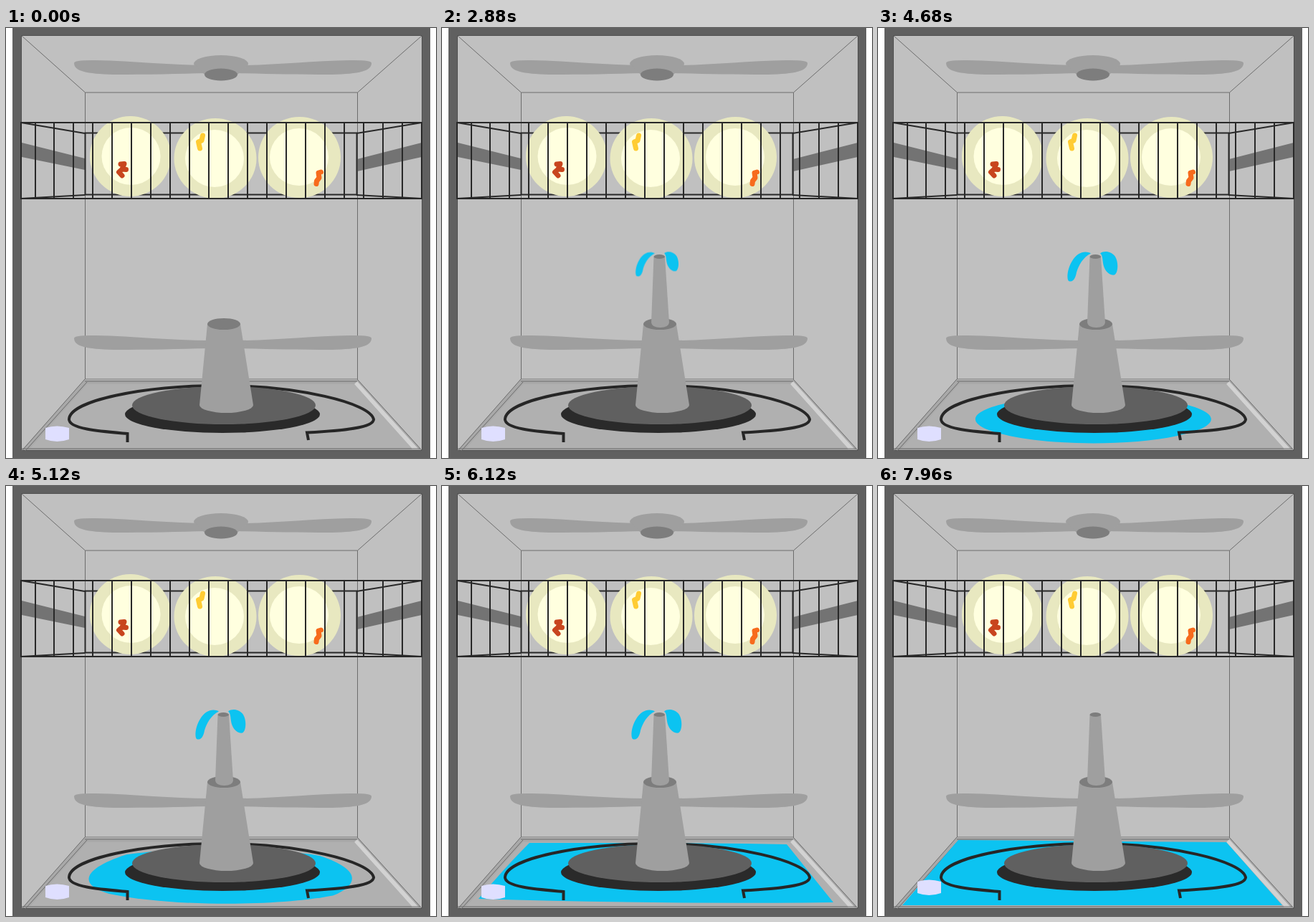
Write an HTML page that moves like this. It is 600 px wide and 600 px high and loops after 8 s.

```html
<!DOCTYPE html>
<html lang="en">
<head>
<meta charset="utf-8">
<title>Dishwasher filling</title>
<style>
  html, body { margin: 0; height: 100%; overflow: hidden; background: #fff; }
  svg { display: block; width: 100vw; height: 100vh; }
  .arm { fill: #9f9f9f; }
  .dark { fill: #7d7d7d; }
  .line { fill: none; stroke: #6c6c6c; }
  .rack { fill: none; stroke: #282828; stroke-width: 2; }
  .rim { fill: #e8e8c0; }
  .well { fill: #ffffdf; }
  .food { fill: none; stroke-width: 7; stroke-linecap: round; stroke-linejoin: round; }
  .water { fill: #0cc3f1; }

  #nozzle, .spray, #puddle, #tablet { animation: 8s linear infinite; }
  #nozzle { animation-name: rise; }
  .spray { animation-name: spray; }
  #puddle { animation-name: fill; }
  #tablet { animation-name: float; }

  @keyframes rise {
    0% { transform: translateY(103px); }
    22.75%, 100% { transform: none; }
  }
  @keyframes spray {
    0%, 22.99% { transform: scale(0); }
    23% { transform: scale(.25); }
    40%, 92.5% { transform: scale(1); }
    99%, 100% { transform: scale(0); }
  }
  /* Spreads from under the base, then takes the shape of the floor */
  @keyframes fill {
    0%, 50% { d: path("M214 529C263 521 341 521 390 529C438 537 438 549 390 557C341 565 263 565 214 557C166 549 166 537 214 529Z"); }
    60.5% { d: path("M177 521C245 506 355 506 423 521C491 535 491 558 423 572C355 587 245 587 177 572C109 558 109 535 177 521Z"); }
    69.5% { d: path("M154 504C230 500 390 500 460 508C492 530 506 550 508 571C400 588 200 586 92 564C80 552 110 530 154 504Z"); }
    76.5% { d: path("M122 498C240 498 360 498 481 500C503 527 524 554 546 581C380 583 215 581 51 576C74 549 97 523 122 498Z"); }
    81.5%, 100% { d: path("M112 494C237 495 361 496 486 497C512 526 538 556 564 585C388 585 211 585 34 585C60 555 86 524 112 494Z"); }
  }
  @keyframes float {
    0%, 81.5% { transform: none; }
    85% { transform: translate(-5px, -1px); }
    89% { transform: translate(2px, -3px); }
    92% { transform: translate(0, -4px); }
    99.5%, 100% { transform: translate(0, -6px); }
  }
</style>
</head>
<body>
<svg viewBox="0 0 600 600" preserveAspectRatio="none">
  <defs>
    <path id="blade" d="M95 49Q95 44.500 125 45C180 46 230 52 284 52L282 63C240 64 200 65 150 65C112 64 95 60 95 49Z"/>
    <g id="blades">
      <use href="#blade"/>
      <use href="#blade" transform="matrix(-1 0 0 1 605 0)"/>
    </g>
    <clipPath id="mouth"><path d="M260 280H350V413H327A23 8 0 0 1 281 413H260Z"/></clipPath>
  </defs>

  <!-- Cabinet -->
  <path fill="#606060" d="M9 0H592V600H9Z"/>
  <path fill="#c0c0c0" stroke="#505050" d="M21.500 10.500H580.500V589.500H21.500Z"/>
  <path class="line" d="M110.500 90H490.500V490H110.500ZM22 11L110.500 90M580 11L490.500 90"/>

  <!-- Floor and its lip -->
  <path fill="#a9a9a9" d="M110 490H490L580 589H22Z"/>
  <path fill="#d2d2d2" d="M486 497L490 493L576 588H567Z"/>
  <path fill="#b0b0b0" d="M113 497H486L566 586H34Z"/>
  <path class="line" d="M110 490L22 590M113 494L27 590M490 490L580 589M110 493H490"/>
  <path class="line" d="M22 587H578"/>

  <path id="puddle" class="water" d="M214 529C263 521 341 521 390 529C438 537 438 549 390 557C341 565 263 565 214 557C166 549 166 537 214 529Z"/>
  <path id="tablet" fill="#dfdfff" d="M55 558Q71 553 88 558V574Q71 580 55 574Z"/>

  <!-- Heater and base -->
  <path fill="none" stroke="#262626" stroke-width="4" d="M169.500 578V566C135 563 88 560 88 546C89 520 190 499 300 499C407 499 508 523 513 546C513 558 470 562 420 564.500L422 575"/>
  <ellipse cx="302" cy="539" rx="136" ry="26" fill="#2a2a2a"/>
  <ellipse cx="304" cy="526.500" rx="128" ry="26.500" fill="#606060"/>

  <!-- Spray arms -->
  <g class="arm">
    <use href="#blades"/>
    <use href="#blades" y="384"/>
    <ellipse cx="300" cy="50" rx="38" ry="12"/>
    <path d="M263 50L277 65H323L338 50Z"/>
    <path d="M281 413L270 526A37.500 11 0 0 0 345 526L327 413Z"/>
  </g>
  <ellipse class="dark" cx="300" cy="65" rx="23" ry="8.500"/>
  <ellipse class="dark" cx="304" cy="413" rx="23" ry="8"/>

  <g clip-path="url(#mouth)">
    <g id="nozzle">
      <path class="arm" d="M295.500 319L292 411Q293 418 304.500 418Q316 418 317 411L311 319Z"/>
      <ellipse class="dark" cx="303.300" cy="319" rx="7.800" ry="3"/>
    </g>
  </g>
  <path class="water spray" style="transform-origin:297px 314px" d="M297 314.500C289 310 278 313 271 325C264 336 263 350 266 353C273 356 276 347 277 341C280 331 286 320 297 314.500Z"/>
  <path class="water spray" style="transform-origin:310px 314px" d="M310 314.500C316 310 326 312 331 319C336 327 335 342 330 344.500C322 346 315 337 314 328C313 320 313 317 310 314.500Z"/>

  <!-- Rails, plates and rack -->
  <path fill="#737373" d="M22 160L110 182V198L22 180ZM490 183L580 160V180L490 200Z"/>
  <path class="rack" d="M110.500 146.500H489.500V232.500H110.500Z"/>

  <ellipse class="rim" cx="173.500" cy="179" rx="56.500" ry="56"/>
  <ellipse class="well" cx="174.500" cy="179" rx="41" ry="40"/>
  <ellipse class="rim" cx="292" cy="182" rx="57.500" ry="56"/>
  <ellipse class="well" cx="291" cy="182" rx="41" ry="40"/>
  <ellipse class="rim" cx="409.500" cy="180.500" rx="57.500" ry="56.500"/>
  <ellipse class="well" cx="409" cy="180" rx="41" ry="40"/>

  <path class="food" stroke="#c8451e" d="M160 190L165 189.500L162 197L157.500 201L162 206M162 197L167.500 197.500"/>
  <path class="food" stroke="#ffcc33" d="M274.500 150L273 157L268.500 159L270.500 168"/>
  <path class="food" stroke="#f76b1c" d="M439.500 201L436 202L437 209L433.500 213.500L433 217.500"/>

  <path class="rack" d="M21 132H580V238H21ZM21 132L110 147M21 238L110 233M580 132L489 147M580 238L489 233"/>
  <path class="rack" id="bars"/>
</svg>
<script>
  const bars = Array.from({ length: 20 }, (_, i) => `M${41 + Math.floor(i * 26.95)} 132V238`);
  document.getElementById('bars').setAttribute('d', bars.join(''));
</script>
</body>
</html>
```
